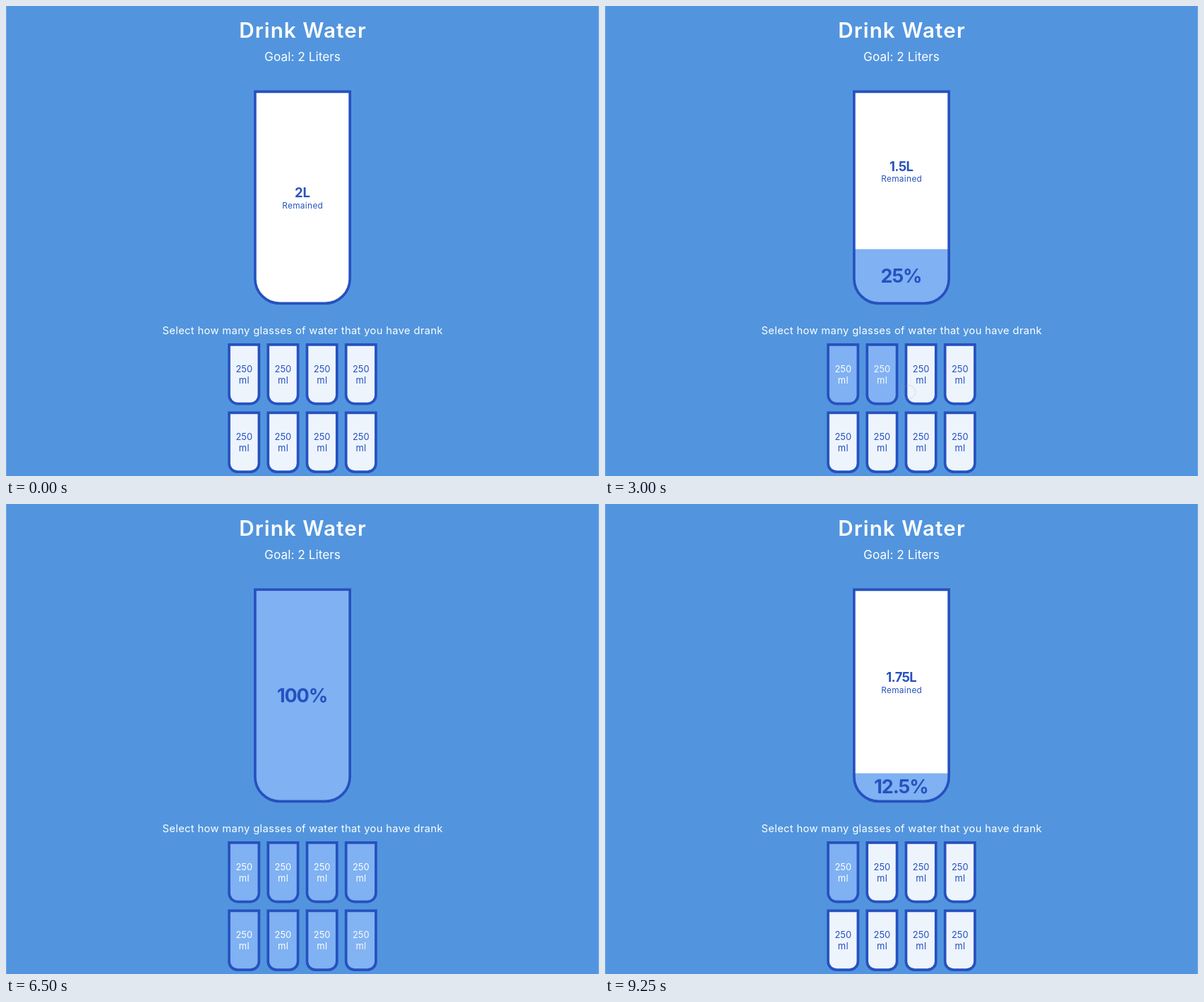
An HTML page with a canvas for the animation above (9.5 s loop, 840 px wide and 666 px high).

```html
<!DOCTYPE html>
<html lang="en">
<head>
<meta charset="utf-8">
<title>Drink Water</title>
<style>
  html, body { margin: 0; width: 100%; height: 100%; overflow: hidden; background: #5295de; }
  canvas { display: block; }
</style>
</head>
<body>
<canvas id="stage" width="840" height="666"></canvas>
<script>
const ctx = document.getElementById('stage').getContext('2d');
const LOOP = 9500, STEP = 250, EASE_MS = 300;
const S = 0.92; // page zoom
const BG = '#5295de', LINE = '#2651bf', WATER = '#7fb1f3';
const BIG = { x: 351, y: 119.6, w: 150 * S, h: 330 * S, r: 40 * S };
const EDGE = 4 * S;
const INNER_TOP = BIG.y + EDGE, INNER_BOTTOM = BIG.y + BIG.h - EDGE;
const LABEL_H = 35.5; // least room the "Remained" label takes

// [time, number of full glasses]
const clicks = [[2035, 1], [2760, 2], [3530, 3], [4850, 7], [6270, 8], [7620, 1]];

// [time, x, y]
const path = [
  [1250, 337, 590], [1500, 337, 550], [2035, 340, 545], [2250, 372, 541],
  [2500, 390, 545], [2760, 394, 547], [3000, 430, 547], [3600, 432, 547],
  [4250, 491, 546], [4500, 470, 595], [4750, 440, 625], [4950, 440, 625],
  [5750, 462, 632], [6000, 498, 630], [6500, 500, 630], [7000, 440, 600],
  [7250, 360, 560], [7500, 335, 557], [8000, 346, 556]
];

const mix = (a, b, k) => a + (b - a) * k;

// Same curve as the CSS "ease" keyword
function ease(p) {
  if (p <= 0) return 0;
  if (p >= 1) return 1;
  const bez = (a, b, u) => 3 * a * u * (1 - u) ** 2 + 3 * b * u * u * (1 - u) + u ** 3;
  let lo = 0, hi = 1;
  for (let i = 0; i < 24; i++) {
    const mid = (lo + hi) / 2;
    if (bez(0.25, 0.25, mid) < p) lo = mid; else hi = mid;
  }
  return bez(0.1, 1, lo);
}

function stateAt(t) {
  let prev = 0, now = 0, start = -EASE_MS;
  for (const [time, count] of clicks) {
    if (t < time) break;
    prev = now;
    now = count;
    start = time;
  }
  return { prev, now, k: ease((t - start) / EASE_MS) };
}

function text(str, x, y, size, weight, color, spacing = 0) {
  ctx.font = `${weight} ${size}px Montserrat, Inter, "Open Sans", sans-serif`;
  ctx.letterSpacing = `${spacing * size}px`;
  ctx.fillStyle = color;
  ctx.textAlign = 'center';
  ctx.fillText(str, x + spacing * size / 2, y);
}

function shape(x, y, w, h, r) {
  ctx.beginPath();
  ctx.roundRect(x, y, w, h, [0, 0, r, r]);
}

function frame(x, y, w, h, r) {
  const half = EDGE / 2;
  shape(x + half, y + half, w - EDGE, h - EDGE, r - half);
  ctx.strokeStyle = LINE;
  ctx.lineWidth = EDGE;
  ctx.stroke();
}

function bigCup({ prev, now, k }) {
  const { x, y, w, h, r } = BIG;
  const room = INNER_BOTTOM - INNER_TOP - (now === 8 ? 0 : LABEL_H);
  const level = Math.min(h * mix(prev, now, k) / 8, room);
  const surface = INNER_BOTTOM - level;

  ctx.save();
  shape(x + 1, y + 1, w - 2, h - 2, r - 1);
  ctx.clip();
  ctx.fillStyle = '#fff';
  ctx.fillRect(x, y, w, h);
  if (level > 0) {
    ctx.fillStyle = WATER;
    ctx.fillRect(x, surface, w, h);
  }
  if (now < 8) {
    const mid = (INNER_TOP + surface) / 2;
    text(2 - now * 0.25 + 'L', 420, mid - 0.1, 18.4, 700, LINE, now ? -0.035 : -0.01);
    text('Remained', 420, mid + 15.3, 11.8, 400, LINE, 0.03);
  }
  if (now > 0) {
    text(now * 12.5 + '%', 420, (surface + INNER_BOTTOM) / 2 + 9.8, 27, 700, LINE, -0.04);
  }
  ctx.restore();
  frame(x, y, w, h, r);
}

function smallCup(i, { prev, now, k }) {
  const x = 314.2 + (i % 4) * 60 * S, y = 478 + Math.floor(i / 4) * 105 * S;
  const w = 50 * S, h = 95 * S, r = 15 * S;
  const full = mix(+(i < prev), +(i < now), k);
  shape(x + 1, y + 1, w - 2, h - 2, r - 1);
  ctx.fillStyle = '#edf4fc';
  ctx.fill();
  ctx.globalAlpha = full;
  ctx.fillStyle = WATER;
  ctx.fill();
  ctx.globalAlpha = 1;
  frame(x, y, w, h, r);
  const color = `rgb(${mix(38, 255, full)}, ${mix(81, 255, full)}, ${mix(191, 255, full)})`;
  text('250', x + w / 2, y + 40.6, 12.9, 400, color);
  text('ml', x + w / 2, y + 56.6, 12.9, 400, color, 0.03);
}

function pointer(t) {
  const hidden = t < path[0][0] || t > path[path.length - 1][0] || (t > 4950 && t < 5750);
  if (hidden) return;
  let i = 1;
  while (i < path.length - 1 && path[i][0] < t) i++;
  const [t0, x0, y0] = path[i - 1], [t1, x1, y1] = path[i];
  const k = (t - t0) / (t1 - t0);
  const pressed = clicks.some(([time]) => t > time - 115 && t < time + 60);
  ctx.beginPath();
  ctx.arc(mix(x0, x1, k), mix(y0, y1, k), pressed ? 7.5 : 9.5, 0, Math.PI * 2);
  if (pressed) {
    ctx.fillStyle = 'rgba(110, 197, 247, 0.68)';
    ctx.fill();
  } else {
    ctx.strokeStyle = 'rgba(150, 165, 190, 0.3)';
    ctx.lineWidth = 1;
    ctx.stroke();
  }
}

function draw(t) {
  ctx.fillStyle = BG;
  ctx.fillRect(0, 0, 840, 666);
  ctx.fillStyle = 'rgba(255, 255, 255, 0.18)';
  ctx.fillRect(0, 0, 1, 666);
  ctx.fillRect(839, 0, 1, 666);

  text('Drink Water', 420, 45, 29.6, 600, '#fff', 0.037);
  text('Goal: 2 Liters', 420, 78.3, 17.2, 400, '#fff', 0.003);
  text('Select how many glasses of water that you have drank', 420, 465.3, 14.72, 400, '#fff', 0.024);

  const state = stateAt(t);
  bigCup(state);
  for (let i = 0; i < 8; i++) smallCup(i, state);
  pointer(t);
}

const begin = performance.now();
function tick() {
  const t = (performance.now() - begin) % LOOP;
  draw(Math.floor(t / STEP) * STEP); // the picture moves four times a second
  requestAnimationFrame(tick);
}
tick();
</script>
</body>
</html>
```
